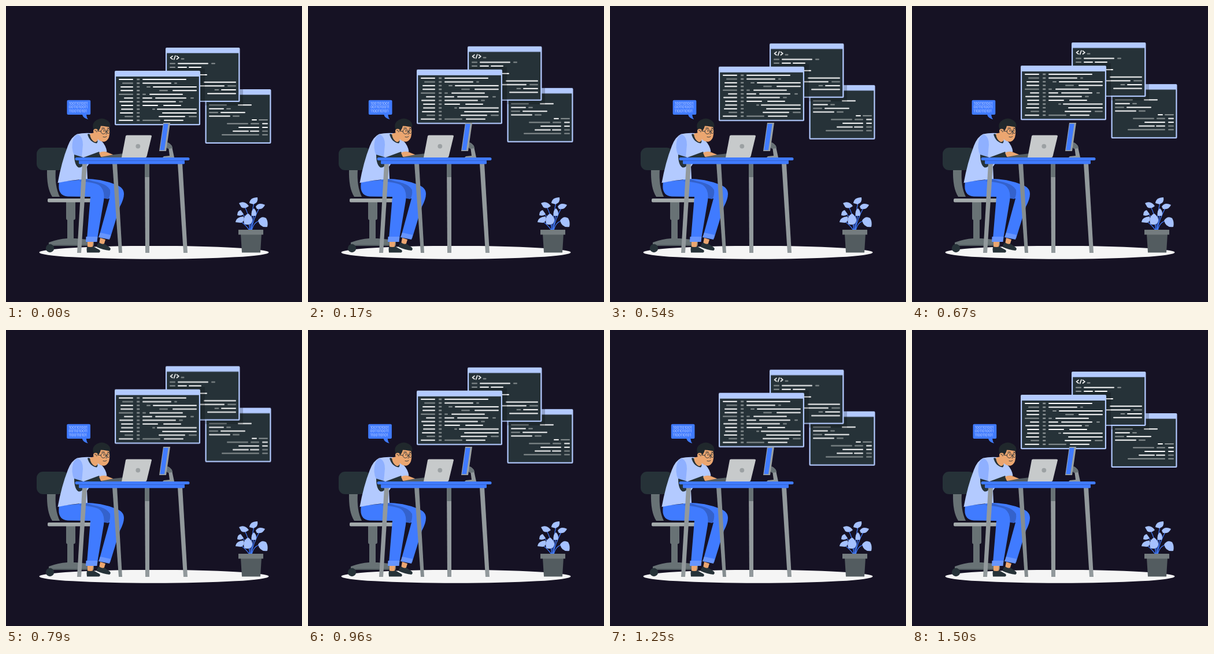
An HTML page for the animation above (1540 ms loop, 512 px wide and 512 px high).

```html
<!DOCTYPE html>
<html lang="en">
<head>
<meta charset="utf-8">
<title>Programmer at a desk</title>
<style>
html, body { margin: 0; width: 100%; height: 100%; overflow: hidden; background: #161224; }
svg { display: block; width: 100vw; height: 100vh; }

.blue { fill: #407bff; }
.deep { fill: #3462cc; }
.pale { fill: #b3caff; }
.dark { fill: #263238; }
.skin { fill: #eba670; }
.metal { fill: #92999c; }
.steel { fill: #687275; }
.ink { fill: none; stroke: #263238; stroke-width: .9; stroke-linecap: round; }
.code { fill: none; stroke-width: 2; stroke-linecap: round; }
.hi { stroke: #fff; }
.lo { stroke: #8b9294; }
.shade { fill: #000; opacity: .2; }
.bits { font: 300 6.4px Inter, Lato, sans-serif; fill: #dce6ff; }

/* Motion advances at 24 steps per second; the last step rests. */
.float { animation: float 1540ms -5ms infinite; }
@keyframes float {
  0% { transform: translateY(0); animation-timing-function: steps(18, end); }
  48.7013% { transform: translateY(-10px); animation-timing-function: steps(18, end); }
  97.4026%, 100% { transform: translateY(0); }
}
</style>
</head>
<body>
<svg viewBox="0 0 512 512">
  <defs>
    <clipPath id="midClip"><rect x="276" y="72" width="128.5" height="94" rx="2"/></clipPath>
    <clipPath id="backClip"><rect x="344.5" y="144" width="114" height="94" rx="2"/></clipPath>
  </defs>

  <ellipse cx="256" cy="426.3" rx="198.5" ry="11.4" fill="#f5f5f5"/>

  <g id="chair">
    <path class="steel" d="M71 282Q70 315 80 330H93Q84 312 86 282Z"/>
    <rect class="dark" x="53" y="245" width="56" height="39" rx="11"/>
    <path class="steel" d="M104 339H120V367Q120 370 117 370V403H106V370Q104 370 104 367Z"/>
    <path class="steel" d="M74 415V409Q90 403 106 402H120L152 405V415Z"/>
    <path class="dark" d="M74 413H152V415H74Z" opacity=".35"/>
    <circle class="dark" cx="76" cy="419" r="7.2"/>
    <rect x="72" y="333" width="78" height="6.4" rx="2" fill="#a3aaab"/>
  </g>

  <g id="plant">
    <g fill="none" stroke="#407bff" stroke-width="1.2">
      <path d="M421 388Q423 364 411 344M423 388Q424 360 430 336M422 388Q420 364 403 357M424 388Q426 372 430 355M424 388Q427 370 440 346M421 388Q415 378 402 370M425 388Q430 368 446 373"/>
    </g>
    <g fill="#a5c1ff">
      <path d="M403 341Q413 336 420 346Q413 352 407 348Z"/>
      <path d="M421 341Q422 331 435 331Q437 340 428 343Z"/>
      <path d="M432 347Q437 339 448 344Q444 353 434 351Z"/>
      <path d="M400 362Q400 354 406 353L411 360Q407 364 400 362Z"/>
      <path d="M425 363Q423 354 429 350Q435 356 432 363Z"/>
      <path d="M397 374Q398 365 411 364Q414 373 406 375Z"/>
      <path d="M412 377Q409 363 419 359Q430 368 424 376Q419 380 412 377Z"/>
      <path d="M436 371Q442 362 450 367Q454 374 452 382Q439 384 436 371Z"/>
    </g>
    <path d="M406 394H442L440 426.5H408Z" fill="#535c60"/>
    <rect x="402" y="387" width="43" height="8.5" fill="#747c7f"/>
  </g>

  <g class="float">
    <g id="back">
      <rect class="pale" x="344.5" y="144" width="114" height="94" rx="2"/>
      <rect class="dark" x="346.7" y="153.5" width="109.6" height="82.3"/>
      <path class="code hi" d="M402 171.3h22M352 177.7h24M372 184.2h41M352 190.6h35M426 197.1h7M444 203.5h8M403 210h34M393 216.4h26M423 216.4h14M444 210h8"/>
      <path class="code lo" d="M352 171.3h29M382 177.7h6M352 184.2h14M393 190.6h10M438 197.1h14M383 203.5h35M424 203.5h13M444 216.4h8M374 222.8h63M444 222.8h8"/>
      <rect class="shade" clip-path="url(#backClip)" x="344" y="138" width="66" height="34"/>
    </g>
    <g id="mid">
      <rect class="pale" x="276" y="72" width="128.5" height="94" rx="2"/>
      <rect class="dark" x="278.2" y="81.5" width="124" height="82.3"/>
      <path class="code hi" stroke-linejoin="round" style="stroke-width:1.6" d="M288 86.6l-3.6 2.7 3.6 2.7M295.4 86.6l3.6 2.7-3.6 2.7M292.9 86l-2.3 6.6"/>
      <path class="code hi" d="M298 99.6h51M298 106h14M317 106h20M320 118.9h27M343 131.8h54M330 138.3h47M373 145h24M349 151.4h48"/>
      <path class="code lo" d="M303.5 91.6h4M284 99.6h8M356 99.6h5M284 106h8M384 138.3h13M361.5 145h6"/>
      <rect class="shade" clip-path="url(#midClip)" x="280" y="108" width="64" height="70"/>
    </g>
    <g id="front">
      <rect class="pale" x="188" y="112" width="148" height="94.3" rx="2"/>
      <rect class="dark" x="190.2" y="122" width="143.6" height="82.1"/>
      <path class="code hi" d="M196 127h23M199 139.9h20M199 146.3h20M205 159.2h14M197 165.6h22M200 172h19M200 178.4h19M198 184.9h21M196 197.7h23"/>
      <path class="code hi" d="M237 127h74M237 133.4h48M255 139.9h74M289 146.3h40M249 152.8h56M237 159.2h15M259 159.2h52M237 165.6h56M237 172h25M273 172h29M262 178.4h67M271 184.9h58M265 191.3h44M274 197.7h32"/>
      <path class="code lo" d="M202 133.4h17M196 152.8h23M206 191.3h13M292 133.4h3M244 139.9h5M266 146.3h13M237 152.8h4M320 159.2h4M300 165.6h5M254 178.4h3M317 191.3h12M237 197.7h29"/>
      <path class="lo" fill="none" stroke-width="5" stroke-dasharray="2.4 4.03" d="M228.7 125.8V199.2"/>
    </g>
  </g>

  <g id="bubble">
    <path class="blue" d="M107.5 162.8H144.2Q146.2 162.8 146.2 164.8V186Q146.2 188 144.2 188H139Q139.5 193 142 196Q133.5 194 132 188H107.5Q105.5 188 105.5 186V164.8Q105.5 162.8 107.5 162.8Z"/>
    <g class="bits">
      <text x="108.8" y="171.2">1001101001</text>
      <text x="108.8" y="177.4">0011010011</text>
      <text x="108.8" y="183.6">1100110101</text>
    </g>
  </g>

  <g id="person">
    <path class="skin" d="M163 401L172 404 169 414 161 411ZM141 406H151L150 418H141Z"/>
    <path class="dark" d="M161 409Q166 413 170 411L180 418Q182 421 179 423Q168 422 157 417Q157 412 161 409Z"/>
    <path class="dark" d="M140 416Q146 418 151 416L162 422Q164 425 161 426.5H140Q139 421 140 416Z"/>

    <path class="blue" d="M126 299Q160 297 190 309Q204 314 204 325Q204 334 197 347L180 402 162 395 179 333 140 327Z"/>
    <path class="deep" d="M130 301Q172 303 180 318Q181 328 177 334L165 332Z"/>
    <path d="M163 392L181 396 179 404 160 400Z" fill="#6795ff"/>
    <path class="blue" d="M92 304Q88 328 107 329.5L146 330 140 402H158L169 337Q172 318 160 309Q150 303 136 300Z"/>
    <path class="deep" d="M126 303Q158 305 168 314Q162 306 138 299Z"/>
    <path d="M138.5 399H158.5L157.5 408H138Z" fill="#6795ff"/>

    <path class="pale" d="M123 221.5Q134 219 148 220L164 232Q173 241 174.5 252L150 264 140 278 141 299Q112 301 89.5 306Q96 270 107 242Q113 226 123 221.5Z"/>
    <path class="dark" d="M143 221L157 229Q160 234 157 237.5Q145 236 141 222Z"/>
    <path class="skin" d="M145 221L156 218 159 231Q157 236 153 235Q146 231 145 221Z"/>
    <path d="M124 222Q133 226 133 240L131 262 118 258Q112 246 116 231Q119 224 124 222Z" fill="#8fb0ff"/>
    <path class="dark" d="M118 257L134 262 161 252 165 261 139 268Q134 279 126 279.5Q118 276 118 257Z"/>
    <path class="skin" d="M161 254Q168 250 175 253L185 257Q187 260 183 261H164Z"/>

    <path class="skin" d="M153 212L163 205 178 208Q180 216 179 222Q178 232 171 234.5Q163 236 157 228Q152 222 153 212Z"/>
    <path d="M151 213Q148 202 157 197Q166 192 174 197Q182 201 180 210Q174 208 164 207.5Q162 215 158 217Z" fill="#20282c"/>
    <circle class="skin" cx="155" cy="216.5" r="4"/>
    <path class="ink" d="M153.5 215Q156 214 157 218"/>
    <g class="ink">
      <circle cx="168.5" cy="217" r="4.3"/>
      <ellipse cx="177" cy="216.5" rx="2.5" ry="4"/>
      <path d="M158 216L164 217M165.5 211.3Q168 209.8 170.5 211.2M175.5 211l2.7.5M173.5 216.5Q175.5 222 173 222M168 226.5Q171.5 228 174 225.8"/>
    </g>
    <circle class="dark" cx="169.5" cy="216" r="1"/>
    <circle class="dark" cx="176.5" cy="215.8" r=".9"/>
  </g>

  <g id="desk">
    <path class="metal" d="M132 272H140L130 427H123Z"/>
    <path d="M184 272H192L201 427H195Z" fill="#858d90"/>
    <path class="metal" d="M240 272H248V427H241Z"/>
    <path class="steel" d="M240 272H248V296H240Z"/>
    <path class="metal" d="M297 272H305L314 427H307Z"/>
    <path d="M165 261L186 257 204 255V262H165Z" fill="#535c60"/>
    <path d="M209 223.5H250Q252.2 223.5 252 225L243.5 260Q243 262 241 262H200L207 225Q207.4 223.5 209 223.5Z" fill="#c7cacb"/>
    <circle cx="228.3" cy="242.6" r="3.9" fill="#9ca1a3"/>
    <path class="metal" d="M280 236Q288 240 288 248L291 262H271L273 260 283 259Z"/>
    <path class="steel" d="M279 236Q288 240 288 246L280 247 277 244Z"/>
    <path d="M272 202H284L277 251H265Z" fill="#9ba2a4"/>
    <path class="blue" d="M272.7 203.7H280.7L274 249.3H266.4Z"/>
    <rect class="deep" x="126" y="265" width="183" height="8.2" rx="1.5"/>
    <rect class="blue" x="126" y="268" width="183" height="5.2" rx="1.5"/>
    <rect class="blue" x="119.5" y="262" width="198" height="5" rx="2.5"/>
  </g>
</svg>
<script>
const bubble = document.getElementById('bubble');
const LOOP = 1540, CYCLE = 1500, STEP = 1000 / 24;
const shake = [0, -1, 2, -4, 4, -4, 4, -4, 2, -1, 0];

// CSS "ease", cubic-bezier(.25, .1, .25, 1), solved by bisection
function ease(x) {
  let lo = 0, hi = 1, s = .5;
  for (let i = 0; i < 20; i++) {
    s = (lo + hi) / 2;
    const bx = .75 * s * (1 - s) + s ** 3;
    if (bx < x) lo = s; else hi = s;
  }
  return .3 * s * (1 - s) ** 2 + 3 * s * s * (1 - s) + s ** 3;
}

function draw() {
  const t = Math.floor((performance.now() % LOOP + 5) / STEP) * STEP;
  const p = Math.min(t / CYCLE, 1) * 10;
  const i = Math.min(Math.floor(p), 9);
  const x = shake[i] + (shake[i + 1] - shake[i]) * ease(p - i);
  bubble.setAttribute('transform', `translate(${x.toFixed(2)} 0)`);
  requestAnimationFrame(draw);
}
draw();
</script>
</body>
</html>
```
